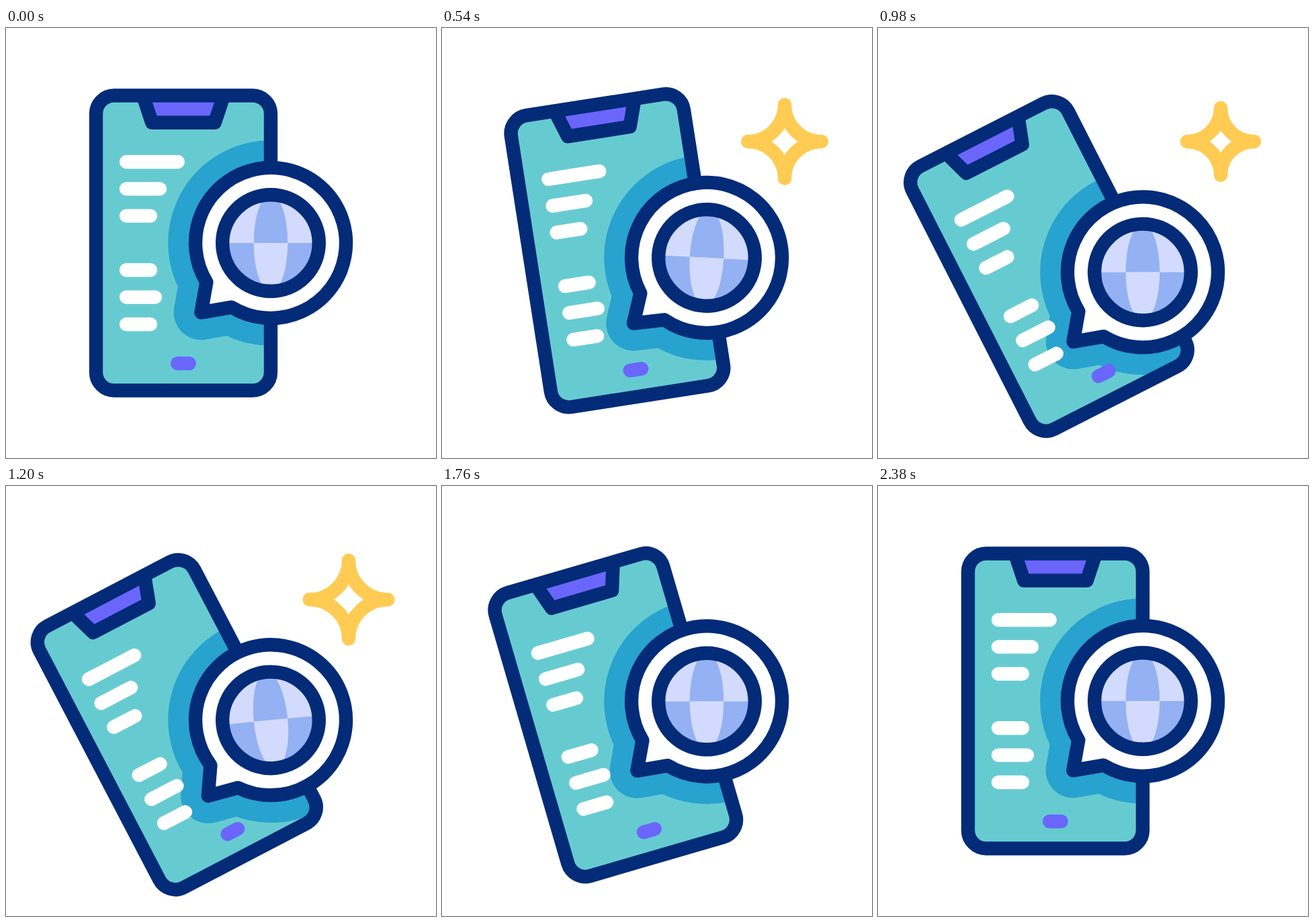
These frames come from a looping animation (640 by 640 pixels, 2.4 s). An HTML page:

```html
<!DOCTYPE html>
<html lang="en">
<head>
<meta charset="utf-8">
<title>Phone with globe bubble</title>
<style>
  html, body { margin: 0; width: 100%; height: 100%; overflow: hidden; background: #fff; }
  svg { display: block; width: 100%; height: 100%; }
  .line { stroke: #032b78; stroke-width: 20.4; stroke-linejoin: round; }
  .bars { stroke: #fff; stroke-width: 20.4; stroke-linecap: round; }
</style>
</head>
<body>
<svg viewBox="0 0 640 640" fill="none">
  <defs>
    <clipPath id="screen"><rect class="phone" x="-130" y="-219.5" width="260" height="439" rx="27"/></clipPath>
    <clipPath id="lens"><ellipse rx="25.3" ry="72"/></clipPath>
    <clipPath id="disc"><circle r="72"/></clipPath>
    <path id="balloon" d="M-95.6 58.2A112 112 0 1 1 -58.2 95.6L-103.6 103.4Z"/>
  </defs>

  <path id="star" stroke="#ffcb52" stroke-linejoin="round"/>

  <rect class="phone" x="-130" y="-219.5" width="260" height="439" rx="27" fill="#66cbd1"/>
  <g clip-path="url(#screen)">
    <use class="bubble" href="#balloon" fill="#28a2cf" stroke="#28a2cf" stroke-width="81.6" stroke-linejoin="round"/>
  </g>
  <g class="phone">
    <path class="line" fill="#6a66fb" d="M-60.2 -219.5L-46.8 -179.3H46.8L60.2 -219.5"/>
    <rect class="line" x="-130" y="-219.5" width="260" height="439" rx="27"/>
    <path class="bars" d="M-85 -120.8H-8.2M-85 -80.6H-35M-85 -40.4H-49M-85 40.3H-49M-85 80.6H-42M-85 121H-49"/>
    <path class="bars" style="stroke:#6a66fb" d="M-8.8 179.3H8.8"/>
  </g>

  <g class="bubble">
    <use href="#balloon" class="line" fill="#fff"/>
    <g clip-path="url(#disc)">
      <path fill="#d2dbfd" d="M-72 0V-72H72V0Z"/>
      <path fill="#94b1f3" d="M-72 0V72H72V0Z"/>
      <g clip-path="url(#lens)">
        <path fill="#94b1f3" d="M-72 0V-72H72V0Z"/>
        <path fill="#d2dbfd" d="M-72 0V72H72V0Z"/>
      </g>
    </g>
    <circle class="line" r="71.8"/>
  </g>
</svg>
<script>
const LOOP = 2400;
const phones = document.querySelectorAll('.phone');
const bubbles = document.querySelectorAll('.bubble');
const star = document.getElementById('star');

// Ease with level ends; a and b are the handle positions in time.
function ease(x, a = 1 / 3, b = 2 / 3) {
  let lo = 0, hi = 1, s = 0.5;
  for (let i = 0; i < 30; i++) {
    s = (lo + hi) / 2;
    const q = 1 - s;
    if (3 * a * s * q * q + 3 * b * s * s * q + s * s * s < x) lo = s; else hi = s;
  }
  return s * s * (3 - 2 * s);
}

// Keys are [time, value, a, b]; the handles shape the stretch up to that key.
function track(keys, t) {
  if (t <= keys[0][0]) return keys[0][1];
  for (let i = 1; i < keys.length; i++) {
    const [t0, v0] = keys[i - 1], [t1, v1, a, b] = keys[i];
    if (t < t1) return v0 + (v1 - v0) * ease((t - t0) / (t1 - t0), a, b);
  }
  return keys[keys.length - 1][1];
}

const tilt = [[0, 0], [1190, 1, 0.78, 0.22], [2380, 0, 0.78, 0.22]];
const height = [[0, 320], [340, 373.3], [710, 317.8], [1000, 364], [1900, 320, 0.3, 0.1]];
const swing = [[0, 0], [340, -17.1], [690, 16], [1140, -6.6], [1440, 3.5], [1740, 0]];
const size = [[200, 0], [410, 67.8], [610, 50], [1100, 50], [1310, 67.8], [1525, 0]];

function place(list, x, y, angle) {
  for (const el of list) el.setAttribute('transform', `translate(${x} ${y}) rotate(${angle})`);
}

function drawStar(r) {
  star.style.display = r > 0.1 ? '' : 'none';
  const arc = (x, y) => `A${r} ${r} 0 0 0 ${510 + x} ${169 + y}`;
  star.setAttribute('d', `M510 ${169 - r}` + arc(r, 0) + arc(0, r) + arc(-r, 0) + arc(0, -r) + 'Z');
  star.setAttribute('stroke-width', Math.min(20.4, 2 * r));
}

function draw(t) {
  const p = track(tilt, t);
  place(phones, 264 - 9.7 * p, 320 + 35.3 * p, -27.6 * p);
  place(bubbles, 394, track(height, t), track(swing, t));
  drawStar(track(size, t));
}

function tick() {
  draw(performance.now() % LOOP);
  requestAnimationFrame(tick);
}
tick();
</script>
</body>
</html>
```
